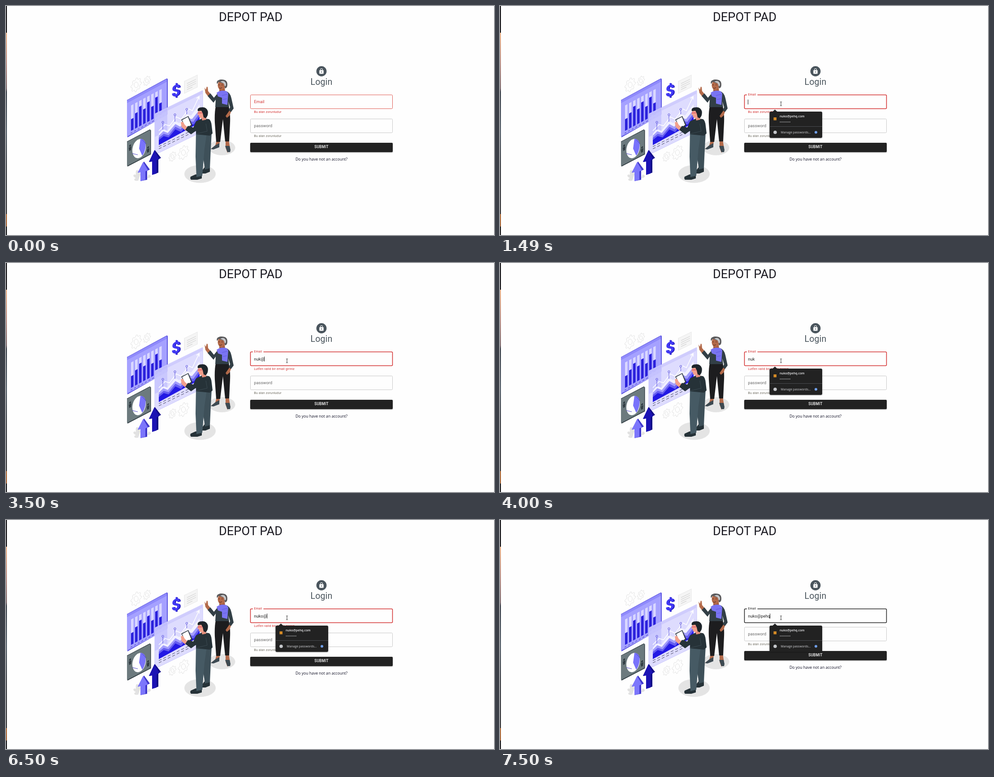
An HTML page for the animation above (7990 ms loop, 1089 by 514 pixels).

```html
<!DOCTYPE html>
<html lang="en">
<head>
<meta charset="utf-8">
<title>Login form</title>
<style>
html, body { margin: 0; width: 100%; height: 100%; overflow: hidden; background: #fefefe; }
svg { display: block; width: 1089px; height: 514px; }
text { font-family: Roboto, sans-serif; white-space: pre; }
.mid { text-anchor: middle; }
.field { font-size: 9.2px; letter-spacing: .0094em; }
.help { font-size: 6.9px; letter-spacing: .033em; }
.ui { font-family: "Open Sans", "Noto Sans", sans-serif; }
.red { fill: #d32f2f; }
.box { fill: none; stroke: #c8c8c8; stroke-width: 1; }
.thin { fill: none; stroke: #e2e2e2; stroke-width: 1; }
</style>
</head>
<body>
<svg viewBox="0 0 1089 514">
  <defs>
    <linearGradient id="edge" x2="0" y2="1">
      <stop offset="0" stop-color="#08060a"/><stop offset=".116" stop-color="#08060a"/>
      <stop offset=".117" stop-color="#f0b183"/><stop offset=".25" stop-color="#b98a80"/>
      <stop offset=".36" stop-color="#7a6467"/><stop offset=".375" stop-color="#2c333d"/>
      <stop offset=".55" stop-color="#4b5661"/><stop offset=".7" stop-color="#33363c"/>
      <stop offset=".908" stop-color="#2a292c"/><stop offset=".909" stop-color="#b0662f"/>
      <stop offset=".962" stop-color="#a05a28"/><stop offset=".963" stop-color="#0b0b0d"/>
    </linearGradient>
    <filter id="soft" x="-10%" y="-30%" width="120%" height="170%">
      <feDropShadow dx="0" dy="1" stdDeviation=".8" flood-opacity=".35"/>
    </filter>
  </defs>
  <rect width="2" height="514" fill="url(#edge)"/>
  <text class="mid" x="546" y="34.300" font-size="27.2" fill="#1b1a22">DEPOT PAD</text>

  <g id="art">
    <g id="gears" class="thin"></g>
    <ellipse cx="482" cy="318" rx="29.5" ry="17" fill="#e4e4e4"/>
    <ellipse cx="433" cy="377" rx="35" ry="20" fill="#e4e4e4"/>

    <!-- note -->
    <g transform="matrix(1 -.48 0 1 398 169)">
      <rect width="29" height="27" fill="#f5f5f5" stroke="#e6e6e6"/>
      <path d="M6 8H26M6 12.500H26M6 17H26M6 21.500H18" stroke="#cfcfcf" stroke-width="1.200"/>
    </g>

    <!-- bar panel -->
    <path d="M270 211L358 163Q361 162 361 165V243L271 295Z" fill="#5a53e0"/>
    <g transform="matrix(1 -.54 0 1 270 212)">
      <rect width="89" height="81" rx="1.500" fill="#a5a1ff"/>
      <rect width="89" height="6" rx="1.500" fill="#8f8afb"/>
      <g id="bars"></g>
      <path d="M8 78H82" stroke="#3a31b8" stroke-width="1" stroke-dasharray="4 4"/>
    </g>

    <!-- dollar -->
    <g transform="matrix(1 -.3 0 1 369 205)" font-size="35" font-weight="900">
      <text x="2" y="1" fill="#1f16bd">$</text>
      <text fill="#4139f4">$</text>
    </g>

    <!-- area panel -->
    <g transform="matrix(1 -.49 0 1 332 242)">
      <rect width="107" height="92" rx="1.500" fill="#dcdafe" fill-opacity=".92" stroke="#c6c3fc"/>
      <rect x="1" y="1" width="105" height="6" fill="#cfccfd"/>
      <path d="M.5 1V52H28V1Z" fill="#9d98fa" opacity=".3"/>
      <path d="M9 78H100M9 83H100" stroke="#3a3a55" stroke-width="1" stroke-dasharray="6 4"/>
    </g>
    <path d="M341 287L350 276 360 280 377 258 387 263 403 242 413 246 432 220V262L341 312Z" fill="#f2f1ff"/>
    <path d="M341 291L351 281 361 285 378 265 389 271 404 250 415 254 432 233V262L341 312Z" fill="#a29dfc"/>
    <path d="M341 296L352 287 363 290 378 271 390 277 405 257 418 260 432 241V262L341 312Z" fill="#665ef0"/>
    <path d="M341 301L352 292 363 295 378 277 391 283 406 264 419 266 432 248V262L341 312Z" fill="#2319e4"/>
    <path d="M341 280L355 266 365 269 380 249 391 254 408 231 416 235 430 205M425 207L431 203 431 210" fill="none" stroke="#fff" stroke-width="1.600"/>
    <g id="pins" fill="none" stroke="#5850dc" stroke-width="1"></g>

    <!-- pie panel -->
    <path d="M270 304L321 277 323.500 279V333L271 360.500Z" fill="#303c42"/>
    <g transform="matrix(1 -.52 0 1 270 305)">
      <rect width="52" height="54" rx="1" fill="#6c7a7e"/>
      <circle cx="7" cy="12" r="2.300" fill="#303c42"/>
      <path d="M4 15H10L9 23H5Z" fill="#303c42"/>
      <circle cx="47" cy="37" r="2.300" fill="#303c42"/>
      <path d="M44 40H50L49 48H45Z" fill="#303c42"/>
    </g>
    <ellipse cx="297" cy="320" rx="14.500" ry="22" transform="rotate(14 297 320)" fill="#fff"/>
    <path d="M297 320L300 298Q314 299 311 319 309 330 304 336Z" fill="#7973fb"/>
    <path d="M282 331L294 334M304 300L313 310" stroke="#4840c8" stroke-width="1"/>

    <!-- arrows -->
    <path d="M295 392C285 394 284 388 290 386 281 383 284 376 290 379 288 366 295 364 300 378ZM315 386C323 387 327 380 318 378Z" fill="#e2e2e2"/>
    <path d="M332 323L346 341 340 344V374L326 379V349L319 350Z" fill="#120c88"/>
    <path d="M331 324L342 344 336 346V376L326 379V349L319 350Z" fill="#1c13b4"/>
    <path d="M308 349L321 367 315 370V390L300 393V373L294 374Z" fill="#4038cc"/>
    <path d="M306 350L317 369 311 371V390L300 393V373L294 374Z" fill="#7c76fb"/>

    <!-- woman -->
    <path d="M470 302L477 303 476 314 464 321 457 321 467 313ZM490 300L497 300 500 319 500 326 494 329 490 318Z" fill="#b36a4a"/>
    <path d="M468 312L476 308 476 317 463 322 457 321ZM489 314L499 314 501 323 500 328 494 328Z" fill="#3d4a52"/>
    <path d="M468 225L497 225Q501 240 500 262L498 304H489L484 254 478 305H469L466 262Q465 240 468 225Z" fill="#1d1d1f"/>
    <path d="M499 234L503 235 499 246 493 251 490 247Z" fill="#b36a4a"/>
    <path d="M443 183L446 188 448 181 450 182 451 191 456 197 451 203 445 195Z" fill="#b36a4a"/>
    <path d="M450 202L456 196 464 206 473 195 490 191Q500 193 503 207L508 230 502 238 497 234 500 227 496 214 498 227 467 227 468 210 463 217Z" fill="#323f46"/>
    <path d="M476 183H488L489 194 481 197 476 193Z" fill="#a35c40"/>
    <path d="M470 195Q478 188 492 191L496 196 494 222 482 219 482 206 473 203Z" fill="#7a74f2"/>
    <path d="M482 201L494 198M484 210L493 208" stroke="#5a52d8" stroke-width=".8"/>
    <ellipse cx="481" cy="178" rx="8.500" ry="11" fill="#b36a4a"/>
    <path d="M471 175Q468 167 479 165 494 164 494 176 494 184 489 185 487 179 486 174 480 173 475 170Z" fill="#59595b"/>
    <path d="M478 170Q488 165 491 175 491 181 488 180 487 175 485 173Z" fill="#c8c8ca"/>
    <path d="M474 177H477M481 177H484M476 184Q479 186 482 183" stroke="#4a2419" stroke-width="1" fill="none"/>

    <!-- man -->
    <path d="M412 383L423 378H437V387L427 390H413Q410 387 412 383ZM437 370L444 361 455 363V372L445 376H438Z" fill="#263238"/>
    <path d="M436 284L459 284 457 320 455 364 444 367 436 315Z" fill="#3e5059"/>
    <path d="M424 283L448 286 443 320 438 381 425 384 423 338Z" fill="#465a64"/>
    <path d="M391 255L407 247 416 268 402 277Z" fill="#303a42"/>
    <path d="M393 256L406 249 413 267 402 274Z" fill="#fff"/>
    <path d="M390 261L395 260 399 267 405 272 401 280 392 272Z" fill="#f2a08c"/>
    <path d="M400 278L406 269 418 273 424 259 438 252 453 254Q458 257 459 269L461 286 455 291 424 288 424 280 413 288Z" fill="#263238"/>
    <path d="M446 264L449 281 424 287" stroke="#3b4a51" stroke-width="1" fill="none"/>
    <path d="M434 245L446 245 447 255 438 257Z" fill="#e48f7c"/>
    <path d="M430 233L441 233 445 247 438 252Q430 252 430 245L427 243Z" fill="#f2a08c"/>
    <path d="M428 236Q426 228 436 227.500 447 226 450.500 236 452 245 446 252L441 250 439 241 436 235Z" fill="#1e252b"/>
    <path d="M428 240H438" stroke="#d63d55" stroke-width="1.200"/>
  </g>

  <circle cx="704" cy="146.500" r="11.400" fill="#4a555d"/>
  <path d="M699.300 145.200Q699.300 144 700.500 144H707.500Q708.700 144 708.700 145.200V151Q708.700 152.200 707.500 152.200H700.500Q699.300 152.200 699.300 151ZM701.100 144V142.800A2.900 2.900 0 0 1 706.900 142.800V144" fill="#fff"/>
  <path d="M702.200 144V142.800A1.800 1.800 0 0 1 705.800 142.800V144Z" fill="#4a555d"/>
  <circle cx="704" cy="148.100" r="1.200" fill="#4a555d"/>
  <text class="mid" x="704" y="176.500" font-size="19.55" letter-spacing=".14" fill="#4a555d">Login</text>

  <rect id="mailBox" class="box" x="545.500" y="199.500" width="317" height="31" rx="2"/>
  <rect id="notch" x="551" y="197" width="23.500" height="5" fill="#fefefe"/>
  <text id="mailLabel" class="field" x="553.500">Email</text>
  <text id="typed" class="field" x="553.500" y="218.500" fill="#212121"></text>
  <rect id="caret" y="210" width="1" height="11" fill="#212121"/>
  <text id="mailHelp" class="help red" x="553.500" y="240"></text>

  <g id="lower">
    <rect id="passBox" class="box" x="545.500" y="253.500" width="317" height="31" rx="2"/>
    <text class="field" x="553.500" y="271.700" fill="#666">password</text>
    <text class="help" x="553.500" y="293.700" fill="#6d6a5e">Bu alan zorunludur</text>
    <rect x="545" y="307" width="318" height="21" rx="2" fill="#202020" filter="url(#soft)"/>
    <text class="mid" x="704" y="319.300" font-size="8.3" font-weight="500" letter-spacing=".22" fill="#fff">SUBMIT</text>
    <text class="mid ui" x="704" y="347" font-size="8.65" fill="#0c0c22">Do you have not an account?</text>
  </g>

  <g id="popup">
    <path filter="url(#soft)" d="M604.500 237H608.500L613.500 232.500 618.500 237H716Q719 237 719 240V293Q719 296 716 296H604.500Q601.500 296 601.500 293V240Q601.500 237 604.500 237Z" fill="#202124"/>
    <path d="M601.500 270.500H719" stroke="#4b4c50" stroke-width="1"/>
    <rect x="610.500" y="250" width="6.500" height="6.500" fill="#d58a25"/>
    <text class="ui" x="624" y="250" font-size="6.85" font-weight="600" fill="#f1f1f3">nuko@pehq.com</text>
    <path d="M625.500 260.300H648" stroke="#d8d9dc" stroke-width="1.700" stroke-linecap="round" stroke-dasharray="0 3.050"/>
    <circle cx="614" cy="283.500" r="3.800" fill="#c4c6ca"/>
    <text class="ui" x="626.500" y="286" font-size="6.85" fill="#d3d4d8">Manage passwords...</text>
    <circle cx="705" cy="283.500" r="3" fill="#6f9eea"/>
  </g>
  <path id="beam" d="M-2-4.500Q0-4.500 0-3.500 0-4.500 2-4.500M0-3.500V3.500M-2 4.500Q0 4.500 0 3.500 0 4.500 2 4.500" fill="none" stroke="#333" stroke-width="1"/>
</svg>
<script>
const $ = id => document.getElementById(id);
const set = (el, attrs) => Object.entries(attrs).forEach(([k, v]) => el.setAttribute(k, v));
const add = (parent, tag, attrs) => {
  const el = document.createElementNS("http://www.w3.org/2000/svg", tag);
  set(el, attrs);
  parent.append(el);
};
const show = (id, on) => $(id).style.display = on ? "" : "none";

function gear(cx, cy, r) {
  const points = [];
  for (let i = 0; i < 32; i++) {
    const a = i / 32 * Math.PI * 2, d = i % 4 < 2 ? r : r * .76;
    const x = Math.cos(a) * d * .85, y = Math.sin(a) * d * 1.08;
    points.push(`${(cx + x).toFixed(1)},${(cy + y - x * .5).toFixed(1)}`);
  }
  add($("gears"), "polygon", { points: points.join(" ") });
  add($("gears"), "ellipse", { cx, cy, rx: r * .33, ry: r * .45 });
}
[[290.5, 177, 14], [314.5, 168, 9.5], [371.5, 338, 9.5], [396, 329, 14]].forEach(g => gear(...g));

[47, 39, 29, 40, 29, 44, 28, 46].forEach((top, i) => {
  const x = 9 + 9 * i;
  add($("bars"), "rect", { x, y: 16, width: 5.5, height: top - 16, fill: "#d9d7ff" });
  add($("bars"), "rect", { x, y: top, width: 5.5, height: 73 - top, fill: "#2a20dc" });
});
[[350, 261, 278], [377, 244, 260], [403.5, 232, 243]].forEach(([cx, cy, end]) => {
  add($("pins"), "circle", { cx, cy, r: 2.2 });
  add($("pins"), "path", { d: `M${cx} ${cy + 2.2}V${end}` });
});

const LOOP = 7990;
const HELP = { empty: "Bu alan zorunludur", invalid: "Lutfen valid bir email giriniz", ok: "" };
// time, phase, typed text, caret shown, popup shown
const steps = [
  [0, "empty"],
  [500, "empty"],
  [990, "empty"],
  [1490, "empty", "", 1, 1],
  [1990, "empty", "", 0, 1],
  [2480, "empty", "", 1, 1],
  [2980, "invalid", "nuk", 1, 1],
  [3500, "invalid", "nuk@", 1, 0],
  [4000, "invalid", "nuk", 0, 1],
  [4500, "invalid", "nuko", 1, 1],
  [4990, "invalid", "nuko", 0, 1],
  [5490, "invalid", "nuko@", 1, 1],
  [6000, "invalid", "nuko@", 0, 1],
  [6500, "invalid", "nuko@", 1, 1],
  [7000, "ok", "nuko@pe", 1, 1],
  [7500, "ok", "nuko@pehq", 1, 1]
];

function render([time, phase, text = "", caret, popup]) {
  const focused = time >= 1490, ok = phase === "ok", hover = time === 500;
  const ink = ok ? "#212121" : "#d32f2f";
  $("mailBox").style.stroke = focused ? ink : "#df5a52";
  $("mailBox").style.strokeWidth = focused ? 1.5 : 1;
  $("passBox").style.stroke = hover ? "#212121" : "";
  show("notch", focused);
  set($("mailLabel"), { y: focused ? 201.3 : 218, fill: ink });
  $("mailLabel").style.fontSize = focused ? "6.9px" : "9.2px";
  $("typed").textContent = text;
  const width = text ? $("typed").getComputedTextLength() : 0;
  $("caret").setAttribute("x", Math.floor(553.5 + width));
  show("caret", caret);
  show("popup", popup);
  $("mailHelp").textContent = HELP[phase];
  $("lower").setAttribute("transform", `translate(0 ${ok ? -13 : 0})`);
  show("beam", time >= 500);
  $("beam").setAttribute("transform", `translate(627 ${hover ? 268.5 : 219.5})`);
}

let current;
function tick() {
  const t = performance.now() % LOOP;
  const step = steps.findLast(s => s[0] <= t);
  if (step !== current) render(current = step);
  requestAnimationFrame(tick);
}
tick();
</script>
</body>
</html>
```
